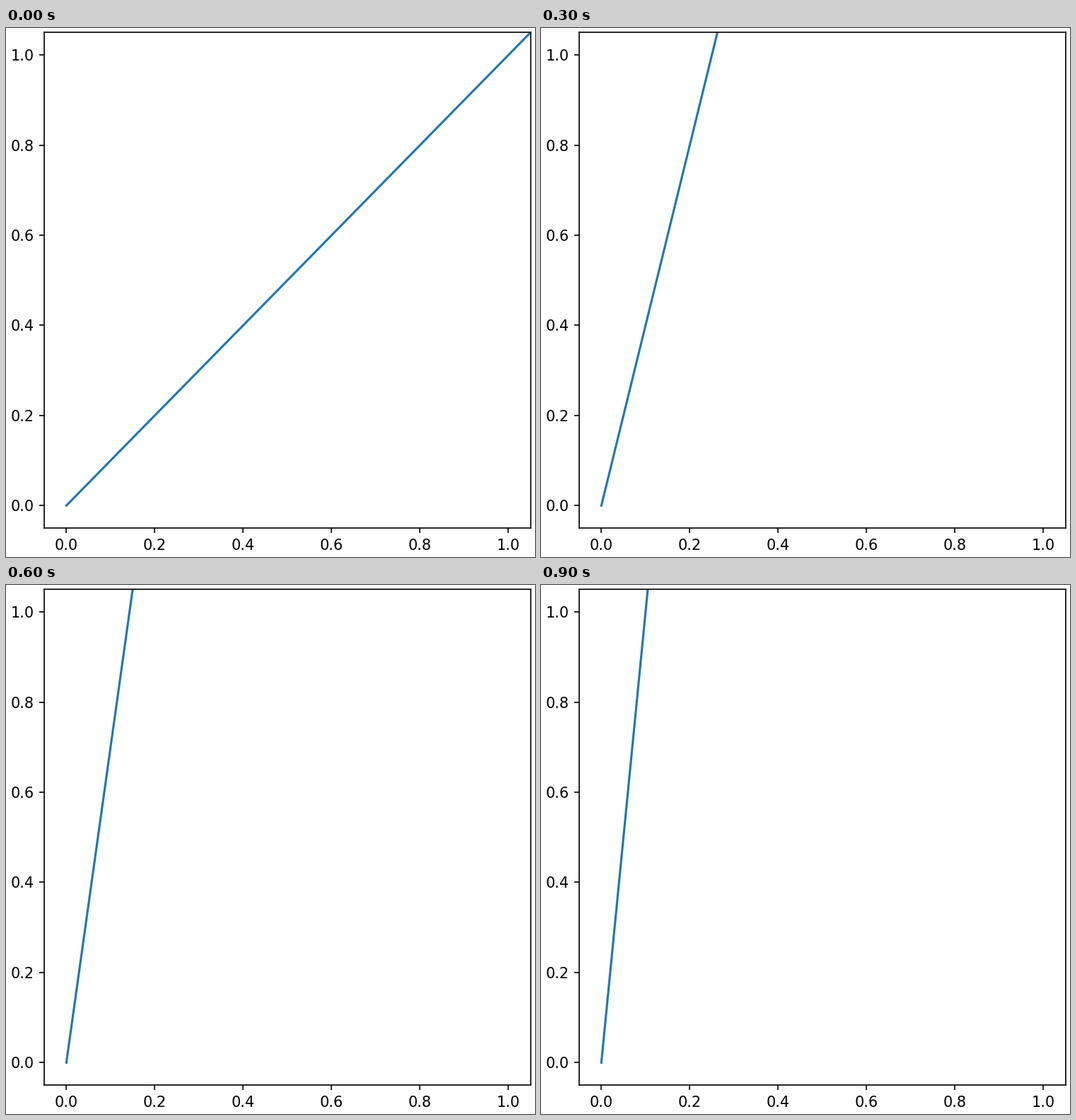
These frames come from a looping animation (748x748 px, 1000 ms). A matplotlib script:

```python
import matplotlib.pyplot as plt
from matplotlib.animation import FuncAnimation

SIZE, DPI = 748, 150
FRAMES, INTERVAL = 10, 100
X_END = 2

plt.rcParams["font.family"] = "DejaVu Sans"

fig, ax = plt.subplots(figsize=(SIZE / DPI, SIZE / DPI), dpi=DPI,
                       layout="constrained")
ax.set(xlim=(-0.05, 1.05), ylim=(-0.05, 1.05))
line, = ax.plot([0, X_END], [0, X_END], color="tab:blue", lw=1.5)


def update(frame):
    # The slope grows by one with every step.
    slope = frame + 1
    line.set_data([0, X_END], [0, slope * X_END])
    return line,


anim = FuncAnimation(fig, update, frames=FRAMES, interval=INTERVAL,
                     repeat=True, repeat_delay=0)
plt.show()
```
